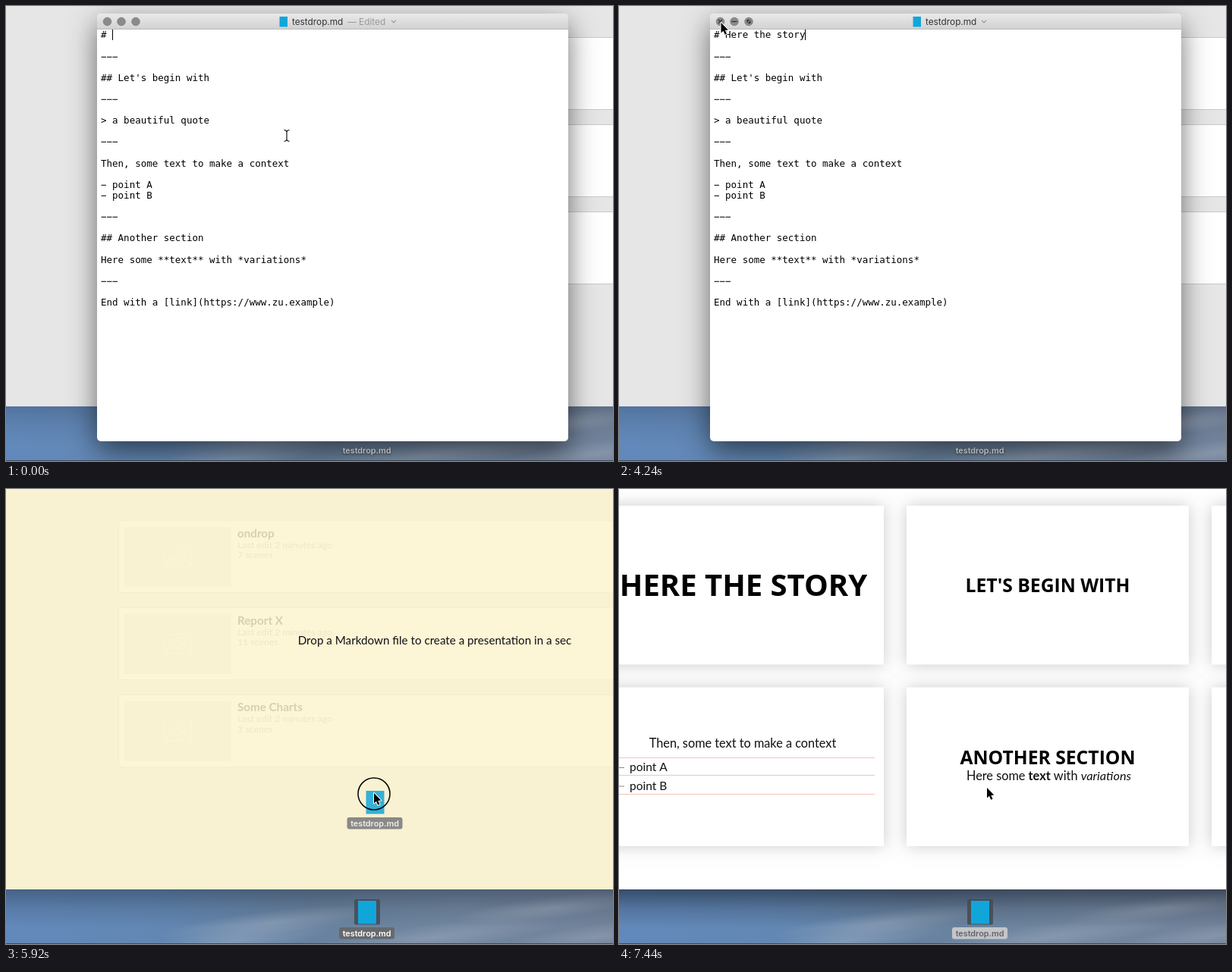
Animation, 800 px wide and 600 px high, one loop 8.68 s. Source, as an HTML page with a canvas:

```html
<!DOCTYPE html>
<html lang="en">
<head>
<meta charset="utf-8">
<title>Drop a file</title>
<style>
html, body { margin: 0; width: 100%; height: 100%; overflow: hidden; }
canvas { display: block; }
</style>
</head>
<body>
<canvas id="stage" width="800" height="600"></canvas>
<script>
const ctx = document.getElementById('stage').getContext('2d');
const LOOP = 8680, STEP = 80, PAGE_H = 528;
const LATO = 'Lato, sans-serif', SANS = '"Open Sans", sans-serif';
const UI = 'Inter, sans-serif', MONO = '"DejaVu Sans Mono", monospace';
const CYAN = '#11a6da';

// Moments of the story, in ms
const TYPE = 160, SAVE = 2480, CLOSE = 4320, SELECT = 5280, PRESS = 5440,
      DRAG = 5920, DROP = 6400, DONE = 6640, SLIDES = 7040, END = 7440;

const typed = 'Here the story';
const lines = {
  2: '−−−', 4: "## Let's begin with", 6: '−−−', 8: '> a beautiful quote', 10: '−−−',
  12: 'Then, some text to make a context', 14: '− point A', 15: '− point B', 17: '−−−',
  19: '## Another section', 21: 'Here some **text** with *variations*', 23: '−−−',
  25: 'End with a [link](https://www.zu.example)'
};
const decks = [['ondrop', 'a few seconds', 7], ['Report X', 'a few seconds', 11], ['Some Charts', 'a minute', 3]];
const path = [[0, 370, 171], [2400, 370, 171], [2640, 507, 275], [2960, 507, 275], [3840, 134.5, 22],
  [CLOSE, 134.5, 22], [SELECT, 474, 552], [DRAG - 1, 474, 552], [DRAG, 485, 401],
  [DROP, 485, 401], [DONE, 485, 394], [LOOP, 485, 394]];

const span = (t, a, b) => Math.min(1, Math.max(0, (t - a) / (b - a)));
const smooth = p => p * p * (3 - 2 * p);

function rect(x, y, w, h, fill, r = 0) {
  ctx.fillStyle = fill;
  ctx.beginPath();
  ctx.roundRect(x, y, w, h, r);
  ctx.fill();
}

function text(str, x, y, font, fill = '#000', align = 'left') {
  ctx.font = font;
  ctx.fillStyle = fill;
  ctx.textAlign = align;
  ctx.fillText(str, x, y);
}

function stroke(points, color, width = 1) {
  ctx.strokeStyle = color;
  ctx.lineWidth = width;
  ctx.beginPath();
  points.forEach(([x, y]) => ctx.lineTo(x, y));
  ctx.stroke();
}

function ring(x, y, r, color, width, fill) {
  ctx.beginPath();
  ctx.arc(x, y, r, 0, 7);
  if (fill) { ctx.fillStyle = fill; ctx.fill(); }
  ctx.strokeStyle = color;
  ctx.lineWidth = width;
  if (width) ctx.stroke();
}

function fade(alpha, draw) {
  ctx.save();
  ctx.globalAlpha = alpha;
  draw();
  ctx.restore();
}

function withShadow(color, blur, dy, draw) {
  ctx.save();
  ctx.shadowColor = color;
  ctx.shadowBlur = blur;
  ctx.shadowOffsetY = dy;
  draw();
  ctx.restore();
}

function gradient(x0, y0, x1, y1, ...colors) {
  const g = ctx.createLinearGradient(x0, y0, x1, y1);
  colors.forEach((c, i) => g.addColorStop(i / (colors.length - 1), c));
  return g;
}

function cloud(x, y, w, h, alpha) {
  ctx.save();
  ctx.translate(x, y);
  ctx.rotate(-.12);
  ctx.scale(w, h);
  const g = ctx.createRadialGradient(0, 0, 0, 0, 0, 1);
  g.addColorStop(0, `rgba(205,208,218,${alpha})`);
  g.addColorStop(1, 'rgba(205,208,218,0)');
  ctx.fillStyle = g;
  ctx.fillRect(-1, -1, 2, 2);
  ctx.restore();
}

function label(x, y, fill, color) {
  if (fill) rect(x - 36.5, y - 8, 73, 15.5, fill, 3);
  text('testdrop.md', x, y + 4, '600 10.8px ' + UI, color, 'center');
}

function desktop(t) {
  rect(0, PAGE_H, 800, 72, gradient(0, 0, 800, 0, '#6289bb', '#6287b3', '#68829f', '#71869f', '#72839b'));
  cloud(350, 572, 150, 16, .3);
  cloud(300, 596, 130, 16, .28);
  cloud(560, 592, 170, 18, .24);
  cloud(720, 552, 130, 15, .3);
  cloud(780, 590, 120, 16, .22);
  const dark = t < CLOSE ? .2 : t < DONE ? .36 : .56;
  rect(0, PAGE_H, 800, 50, gradient(0, PAGE_H, 0, 578, `rgba(20,28,42,${dark})`, `rgba(20,28,42,${dark * .35})`, 'rgba(20,28,42,0)'));
  rect(0, 599, 800, 1, '#3f4a5a');
  const chosen = t >= SELECT;
  if (chosen) rect(459, 541, 34, 33.5, 'rgba(70,74,82,.85)', 2);
  rect(464, 543, 24, 30.5, CYAN);
  if (!chosen) withShadow('rgba(0,0,0,.6)', 3, 1, () => label(475.5, 586, null, '#fff'));
  else if (t < DONE) label(475.5, 586, '#66696e', '#fff');
  else label(475.5, 586, '#c3c5c9', '#62656a');
}

function deckList(t) {
  rect(0, 0, 800, PAGE_H, '#e6e6e6');
  decks.forEach(([name, age, count], i) => {
    const y = 41 + 115 * i, ty = 64 + 114.6 * i;
    rect(148, y, 660, 96, '#c9c9c9');
    rect(149, y + 1, 660, 94, '#fff');
    rect(156, y + 9, 141, 79, '#e4e4e4');
    ctx.strokeStyle = '#fafafa';
    ctx.lineWidth = 1.3;
    ctx.strokeRect(209, y + 35.5, 35, 25.5);
    ring(229, y + 43, 3, '#fafafa', 1.3);
    stroke([[209, y + 60], [220, y + 47], [233, y + 61]], '#fafafa', 1.3);
    stroke([[226, y + 54], [233, y + 48], [244, y + 60]], '#fafafa', 1.3);
    text(name, 305, ty, 'bold 15.2px ' + LATO);
    text(`Last edit ${t < DRAG ? age : '2 minutes'} ago`, 305, ty + 14, '12.3px ' + LATO, '#999');
    text(count + ' scenes', 305, ty + 27.3, '12.3px ' + LATO, '#999');
  });
}

function dropZone() {
  rect(0, 0, 800, PAGE_H, 'rgba(252,244,207,.85)');
  text('Drop a Markdown file to create a presentation in a sec', 565, 205, '15.2px ' + LATO, '#111', 'center');
}

function slides() {
  ctx.save();
  ctx.beginPath();
  ctx.rect(0, 0, 800, PAGE_H);
  ctx.clip();
  rect(0, 0, 800, PAGE_H, '#fff');
  for (const y of [22, 261.5])
    for (const x of [-23, 379, 781])
      withShadow('rgba(0,0,0,.2)', 20, 0, () => rect(x, y, 372, 209.5, '#fff'));
  text('HERE THE STORY', 164, 141, 'bold 40px ' + SANS, '#000', 'center');
  text("LET'S BEGIN WITH", 565, 135.5, 'bold 24.7px ' + SANS, '#000', 'center');
  text('ANOTHER SECTION', 565, 363, 'bold 24.7px ' + SANS, '#000', 'center');
  text('Then, some text to make a context', 163, 341, '16.3px ' + LATO, '#111', 'center');
  [[354, '#f3c3bb'], [377, '#d5cfcd'], [402, '#f3c3bb']].forEach(([y, c]) => rect(0, y, 337, 1, c));
  ['point A', 'point B'].forEach((item, i) => {
    rect(0, 367 + 24.5 * i, 7, 1, '#8a8a78');
    text(item, 14, 372 + 24.5 * i, '15.5px ' + LATO, '#111');
  });
  let x = 458;
  for (const [style, part] of [['', 'Here some '], ['bold ', 'text'], ['', ' with '], ['italic ', 'variations']]) {
    text(part, x, 384, style + '16.3px ' + LATO, '#111');
    x += ctx.measureText(part).width;
  }
  ctx.restore();
}

function titleBar(t, hover) {
  rect(120, 10, 621, 21, gradient(0, 10, 0, 31, '#e9e9e9', '#d1d1d1'), [5, 5, 0, 0]);
  rect(120, 30, 621, 1, '#b9b9b9');
  [133.5, 152, 171].forEach(x => ring(x, 20.5, 5.3, '#7b7b7b', .8, '#8b8b8b'));
  if (hover) {
    stroke([[131, 18], [136, 23]], '#333', 1.2);
    stroke([[136, 18], [131, 23]], '#333', 1.2);
    stroke([[148.5, 20.5], [155.5, 20.5]], '#333', 1.3);
    rect(168.5, 18, 5, 5, '#333');
    stroke([[168, 23.5], [174, 17.5]], '#8b8b8b', 1.2);
  }
  const p = smooth(span(t, SAVE, 2800)), dx = 27 * p, cx = 511 - 30 * p;
  rect(360.5 + dx, 14, 10.5, 13.5, CYAN);
  text('testdrop.md', 377 + dx, 25, '11.8px ' + UI, '#333');
  fade(Math.max(0, 1 - 2 * p), () => text('— Edited', 450 + dx, 25, '11.8px ' + UI, '#999'));
  stroke([[cx - 3, 19], [cx, 22], [cx + 3, 19]], '#999', 1.1);
}

function editor(t, hover) {
  withShadow('rgba(0,0,0,.55)', 36, 13, () => rect(120, 10, 621, 564, '#fff', 5));
  titleBar(t, hover);
  const font = '12.5px ' + MONO, row = i => 42.4 + 14.1 * i;
  const count = t < TYPE ? 0 : Math.min(typed.length, 1 + Math.floor((t - TYPE) / 150));
  const first = '# ' + typed.slice(0, count);
  text(first, 125, row(0), font);
  if (t < 3280 || t >= 3840) rect(Math.round(125 + ctx.measureText(first).width), 31, 1, 14, '#000');
  for (const i in lines) text(lines[i], 125, row(i), font);
}

function pointer(t) {
  const k = path.findIndex(p => p[0] > t);
  const [t0, x0, y0] = path[k - 1], [t1, x1, y1] = path[k];
  const p = 1 - (1 - span(t, t0, t1)) ** 3;
  return [x0 + (x1 - x0) * p, y0 + (y1 - y0) * p];
}

function iBeam(x, y) {
  for (const [c, w] of [['#fff', 3], ['#111', 1.2]]) {
    stroke([[x, y - 6], [x, y + 6]], c, w);
    for (const s of [-1, 1])
      stroke([[x - 3.5, y + 7.5 * s], [x - 1.5, y + 7 * s], [x, y + 5.5 * s], [x + 1.5, y + 7 * s], [x + 3.5, y + 7.5 * s]], c, w);
  }
}

function arrow(x, y) {
  ctx.save();
  ctx.translate(x, y);
  ctx.beginPath();
  [[0, 0], [0, 13.5], [3, 10.7], [5.2, 15.8], [7.5, 14.8], [5.3, 9.9], [9.3, 9.6]].forEach(([a, b]) => ctx.lineTo(a, b));
  ctx.closePath();
  ctx.lineWidth = 2;
  ctx.lineJoin = 'round';
  ctx.strokeStyle = '#fff';
  ctx.stroke();
  ctx.fillStyle = '#000';
  ctx.fill();
  ctx.restore();
}

function draw(t) {
  const [x, y] = pointer(t);
  const open = t < CLOSE;
  desktop(t);
  if (t < END) deckList(t);
  if (t >= DRAG && t < END) dropZone();
  if (t >= SLIDES) fade(span(t, SLIDES, END), slides);
  if (open) editor(t, y < 31);
  if (t >= DRAG && t < DONE) fade(.85 * (1 - span(t, DROP - STEP, DONE)), () => {
    rect(474.5, 398, 24, 30.5, CYAN);
    label(486, 441, '#77777a', '#fff');
  });
  if (t >= PRESS && t < DROP) {
    if (t < DRAG) ring(474, 553, 21, '#fff', 3.5);
    ring(x, y + 1, 21, '#000', 1.5);
  }
  if (open && y > 31) {
    if (t < TYPE || t >= 2400) iBeam(x, y);
  } else arrow(x, y);
}

const start = performance.now();
function tick() {
  const t = (performance.now() - start) % LOOP;
  draw(Math.floor(t / STEP) * STEP);
  requestAnimationFrame(tick);
}
tick();
</script>
</body>
</html>
```
